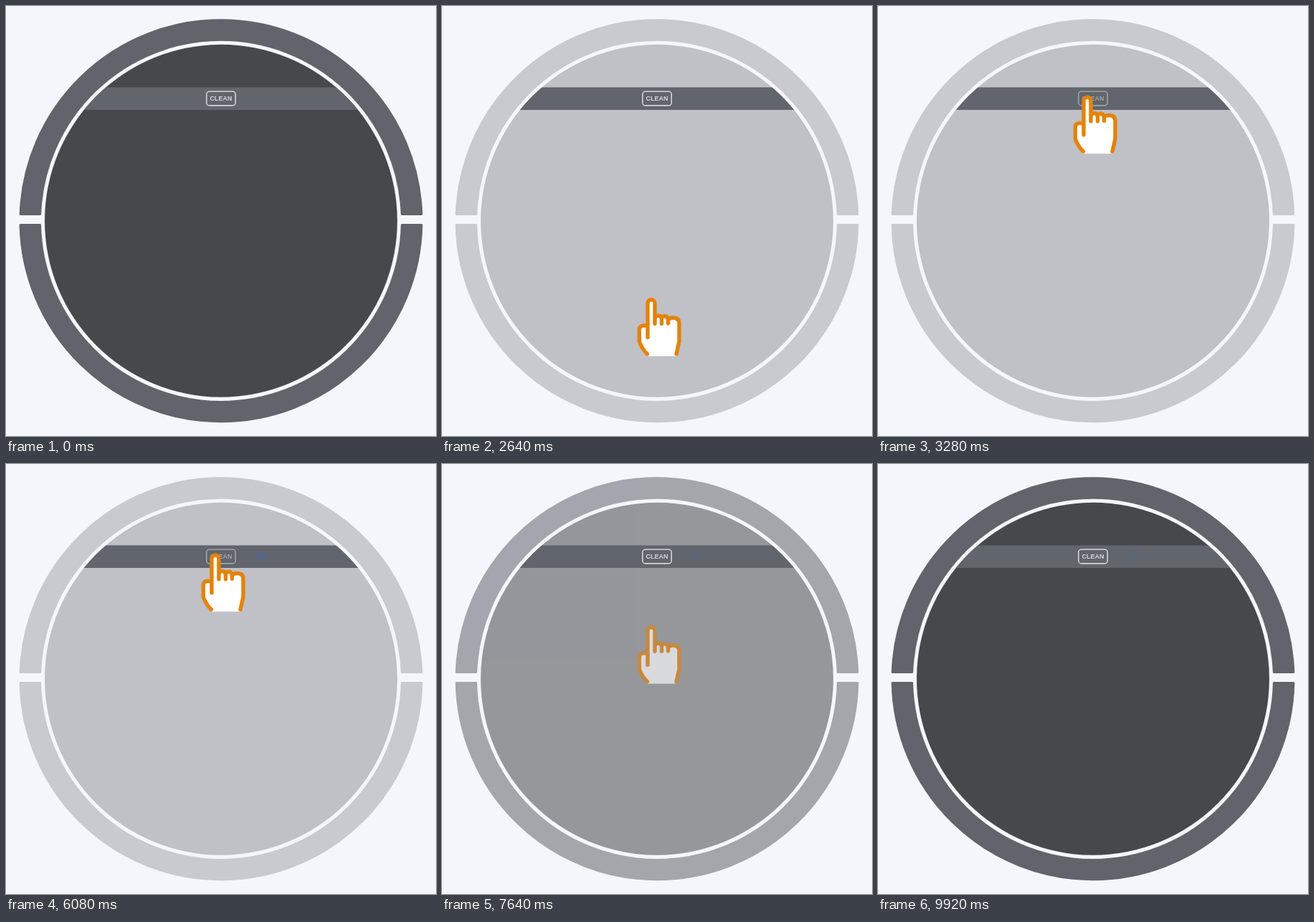
Animation of 600 by 600 pixels, one loop 9960 ms. Source, as an HTML page:

```html
<!DOCTYPE html>
<html lang="en">
<head>
<meta charset="utf-8">
<title>Robot vacuum: press CLEAN</title>
<style>
  html, body { margin: 0; width: 100%; height: 100%; overflow: hidden; background: #f4f6fb; }
  svg { display: block; width: 100%; height: 100%; }

  .body, .hand, .press, .button, .wifi {
    animation: 9960ms cubic-bezier(.37, 0, .63, 1) infinite;
  }
  .body { animation-name: dim; }
  .hand { animation-name: appear; }
  .press { animation-name: press; }
  .button { animation-name: button; }
  .wifi { animation-name: pulse; }

  @keyframes dim {
    0%, 10.843% { opacity: 1; }
    20.181%, 73.946% { opacity: .3; }
    80.773%, 100% { opacity: 1; }
  }
  @keyframes appear {
    0%, 10.843% { opacity: 0; }
    20.181%, 73.946% { opacity: 1; }
    80.773%, 100% { opacity: 0; }
  }
  @keyframes press {
    0%, 26.104% { transform: translateY(2.3px); }
    32.932%, 73.946% { transform: translateY(-282.8px); }
    80.773%, 100% { transform: translateY(2.3px); }
  }
  @keyframes button {
    0%, 30.12% { opacity: 1; }
    32.932%, 60.643% { opacity: .55; }
    64.257%, 100% { opacity: 1; }
  }
  /* Stays off, then switches on and breathes every 800 ms */
  @keyframes pulse {
    0%, 60.99% { opacity: 0; }
    60.994% { opacity: .35; }
    64.458%, 72.49%, 80.522%, 88.554%, 96.586% { opacity: 1; }
    68.474%, 76.506%, 84.538%, 92.57% { opacity: .12; }
    100% { opacity: .18; }
  }

  .ring { fill: #61646b; stroke: #61646b; stroke-width: 3; stroke-linejoin: round; }
  .button rect { fill: none; stroke: #d2d4d8; stroke-width: 1.6; }
  .button text { fill: #d2d4d8; font: bold 9px "Liberation Sans", Arial, sans-serif; text-anchor: middle; }
  .wifi { fill: none; stroke: #2f6fe0; stroke-width: 2; stroke-linecap: round; }
  .outline { fill: none; stroke: #e5820a; stroke-width: 5.4; stroke-linecap: round; stroke-linejoin: round; }
</style>
</head>
<body>
<svg viewBox="0 0 600 600">
  <clipPath id="lid"><circle cx="300" cy="299.8" r="246"/></clipPath>

  <g class="body">
    <path class="ring" d="M20.15 290.5A280 280 0 0 1 579.85 290.5H552.33A252.5 252.5 0 0 0 47.67 290.5Z"/>
    <path class="ring" d="M20.06 305.5A280 280 0 0 0 579.94 305.5H552.44A252.5 252.5 0 0 1 47.56 305.5Z"/>
    <circle cx="300" cy="299.8" r="246" fill="#47484c"/>
  </g>

  <rect x="50" y="113.5" width="500" height="31.5" fill="#61656c" clip-path="url(#lid)"/>

  <g class="button">
    <rect x="279.8" y="119.3" width="40.4" height="19.6" rx="4"/>
    <text x="300" y="132.4">CLEAN</text>
  </g>

  <g class="wifi">
    <path d="M348.5 128A10.5 10.5 0 0 1 363.5 128M351.2 130.9A7 7 0 0 1 360.8 130.9M353.8 133.4A3.4 3.4 0 0 1 358.2 133.4M356 135.2v.1"/>
  </g>

  <g class="hand">
    <g class="press">
      <path fill="#fff" d="M287 415a5 5 0 0 1 10 0V435q1-3 4.5-3q4 0 5 3q1-2.5 4-2.5q4 0 5 4q2-1.5 6-1.5q9.5 0 9.5 7V468L327 488.7H287L275.3 469V451q0-5 6-5.2q3 0 5.7 2Z"/>
      <path class="outline" d="M287 462.500V415a5 5 0 0 1 10 0V443.500
        M297 436q1-3.800 4.500-3.800q5 0 5 6V443.500
        M306.500 436q1-3 4-3q5 0 5 6V443
        M315.500 438q2-2.800 6.500-2.800q9 0 9 7.500V468L327 485.800
        M286 446.500q-10.700-2-10.700 5.500V468.500Q280 480 286.500 485.800"/>
    </g>
  </g>
</svg>
</body>
</html>
```
